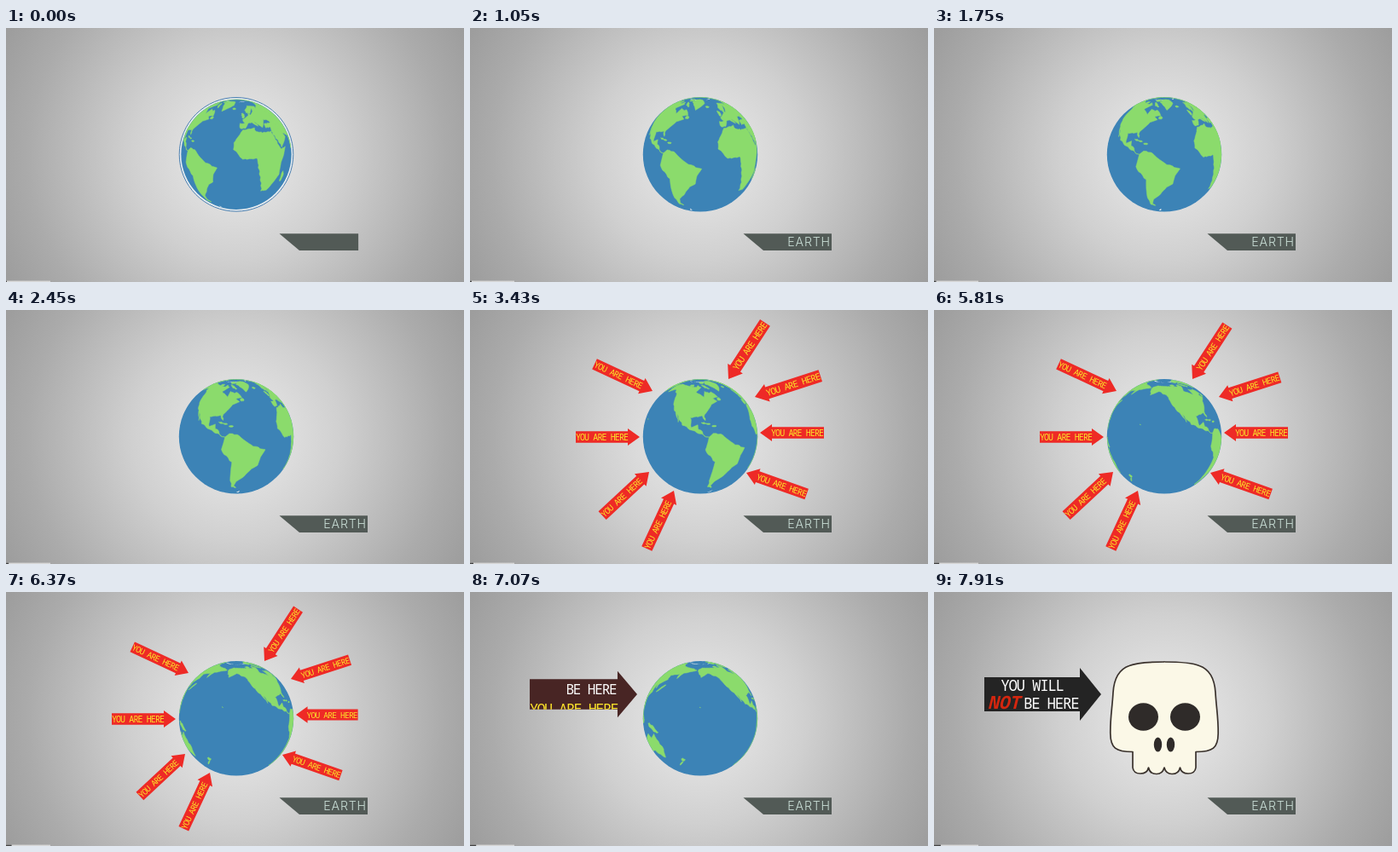
These frames come from a looping animation (537 by 298 pixels, 8 s). An HTML page:

```html
<!DOCTYPE html>
<html lang="en">
<head>
<meta charset="utf-8">
<title>Earth</title>
<style>
html, body { margin: 0; width: 100%; height: 100%; overflow: hidden; background: #aaa; }
svg { display: block; width: 100vw; height: 100vh; }
.mono { font-family: "Noto Sans Mono", "DejaVu Sans Mono", monospace; }
.you { font-size: 10px; letter-spacing: -.9px; fill: #fbe32a; }
.big { font-size: 17.5px; letter-spacing: -1.3px; fill: #fff; }
.not { font-size: 21px; font-weight: 700; font-style: italic; fill: #d3260f; }
.label { font: 300 14.2px Inter, "Open Sans", sans-serif; letter-spacing: .8px; fill: #c9ded6; }
</style>
</head>
<body>
<svg viewBox="0 0 537 298">
  <defs>
    <radialGradient id="bg" gradientUnits="userSpaceOnUse" cx="270" cy="149" r="305">
      <stop offset="0" stop-color="#ececec"/>
      <stop offset=".4" stop-color="#d0d0d0"/>
      <stop offset=".8" stop-color="#ababab"/>
      <stop offset="1" stop-color="#9d9d9d"/>
    </radialGradient>
    <clipPath id="disk"><circle r="67.3"/></clipPath>
    <clipPath id="tagClip"><path id="tagEdge"/></clipPath>
    <clipPath id="shaftClip"><rect id="shaft"/></clipPath>
  </defs>
  <rect width="537" height="298" fill="url(#bg)"/>
  <rect y="296.6" width="52" height="1.4" fill="#d9d9d9"/>
  <rect id="played" y="296.6" height="1.4" fill="#444"/>

  <circle id="ring" cx="270" cy="148.3" r="66.8" fill="#e9edf0" stroke="#4a7fb0"/>
  <g id="globe">
    <circle r="67.2" fill="#3c83b6"/>
    <g clip-path="url(#disk)">
      <path id="ice" fill="#f1f3f1"/>
      <path id="land" fill="#8bdb6c" stroke="#8bdb6c" stroke-width=".5" stroke-linejoin="round"/>
    </g>
  </g>

  <g id="skull">
    <g id="half">
      <path fill="#fbf8e7" stroke="#3a322d" stroke-width="1.7" stroke-linejoin="round"
        d="M-.5 -66C20 -66 33 -65 41 -61.5C54 -57 59 -46 60 -30C61 -12 63.5 0 63.2 18C63 35 57 39.5 37 39.5V58Q36 65 28 65Q20 65 18.5 58Q17 65.5 9 65.5Q2 65.5 0 58L-.5 58"/>
      <g fill="#2f2b29">
        <ellipse cx="24.500" cy="-1.500" rx="17.500" ry="16.300"/>
        <ellipse cx="7.500" cy="31" rx="4.700" ry="8.600"/>
      </g>
    </g>
    <use href="#half" transform="scale(-1 1)"/>
  </g>

  <g id="arrows"></g>

  <g id="hero">
    <path id="heroShape"/>
    <g clip-path="url(#shaftClip)">
      <text id="oldText" class="mono you" text-anchor="middle" y="3.6">YOU ARE HERE</text>
      <g id="newText">
        <text class="mono big" x="-81" y="-4" text-anchor="middle">YOU WILL</text>
        <text class="mono big" x="-91" y="17">BE HERE</text>
      </g>
    </g>
    <text id="not" class="mono not" text-anchor="middle" y="7.5">NOT</text>
  </g>

  <path id="tag" fill="#525a56"/>
  <g clip-path="url(#tagClip)"><text id="earth" class="label" y="256">EARTH</text></g>
</svg>
<script>
const LOOP = 8000, R = 67, RAD = Math.PI / 180, TILT = 9 * RAD;
const RED = [238, 42, 38], DARK = [36, 36, 36];
const $ = id => document.getElementById(id);
const set = (el, attrs) => { for (const k in attrs) el.setAttribute(k, attrs[k]); };
const show = (el, on) => set(el, { visibility: on ? "visible" : "hidden" });
const span = (t, a, b) => Math.min(1, Math.max(0, (t - a) / (b - a)));
const lerp = (a, b, p) => a + (b - a) * p;
const easeOut = p => 1 - (1 - p) ** 3;
const inOut = p => p < .5 ? 2 * p * p : 1 - 2 * (1 - p) ** 2;
const backOut = p => 1 + 2.7 * (p - 1) ** 3 + 1.7 * (p - 1) ** 2;

// Rough coastlines as lon, lat pairs
const northAmerica = [-167,67,-156,71,-128,70,-96,68,-94,72,-84,68,-94,60,-88,57,-80,52,-77,61,-69,58,
  -64,60,-56,52,-66,50,-61,46,-70,43,-76,36,-81,31,-80,25,-84,30,-97,28,-95,18,-88,21,-88,16,-83,14,
  -82,9,-77,8,-92,14,-105,20,-114,31,-110,23,-117,33,-124,41,-130,54,-146,61,-160,55,-165,62];
const southAmerica = [-77,8,-72,12,-62,10,-50,0,-35,-6,-39,-13,-41,-22,-48,-26,-57,-37,-65,-43,-69,-51,
  -66,-55,-73,-53,-73,-40,-70,-18,-81,-5,-78,3];
const africa = [-6,35,10,37,11,33,20,31,33,31,39,15,43,11,51,12,40,-4,40,-16,35,-22,27,-34,19,-34,13,-17,
  9,-1,9,4,-7,4,-17,14,-17,21,-10,30];
const europe = [-9,37,-9,43,-2,43,-4,48,8,54,8,57,12,54,22,60,25,65,17,60,12,56,6,58,5,62,20,70,41,67,38,64,
  60,69,50,30,35,31,36,36,28,36,28,41,41,41,37,45,31,46,23,37,13,45,17,39,9,44,3,43,-2,37];
const asia = [60,69,73,72,104,77,140,72,180,69,190,66,163,60,157,51,156,58,137,54,140,48,128,41,127,35,122,39,
  122,30,108,21,109,12,100,13,103,2,98,16,91,22,80,14,77,8,72,21,57,26,50,30];
const arabia = [50,30,59,22,44,13,35,28,35,31];
const greenland = [-45,60,-55,70,-68,76,-60,82,-35,83,-20,81,-22,72];
const australia = [114,-22,130,-12,136,-16,142,-11,153,-26,148,-38,131,-31,115,-34];
// Islands: lon, lat, half width, half height, slant
const islands = [[-73,69,10,2,-.4], [-80,79,12,3,0], [-111,71,7,2,0], [-56,49,3,2,0], [-80,22,5,.6,-.2],
  [-71,19,2.5,.8,0], [47,-19,2.5,6,0], [-2,54,2.5,4,0], [-19,65,4.500,1.5,0], [139,37,6,1.5,.8],
  [114,0,5,4,0], [141,-5,9,2.500,-.4], [176,-38,2.5,2,0], [171,-44,4,1,.8], [-162,20,.8,.5,0]];

function blob([lon, lat, w, h, slant]) {
  const ring = [];
  for (let a = 0; a < 6.2; a += .785) {
    const x = w * Math.cos(a);
    ring.push(lon + x, lat + h * Math.sin(a) + x * slant);
  }
  return ring;
}

// Split long edges so they bend with the sphere, and ripple the coast
function dense(ring) {
  const pts = [], n = ring.length;
  for (let i = 0; i < n; i += 2) {
    const [x, y, u, v] = [0, 1, 2, 3].map(k => ring[(i + k) % n]);
    const steps = Math.ceil(Math.max(Math.abs(u - x), Math.abs(v - y)) / 2.5);
    for (let k = 0; k < steps; k++) {
      const lon = lerp(x, u, k / steps), lat = lerp(y, v, k / steps);
      const wave = .55 * Math.sin(lon * 1.7 + lat * 2.3);
      pts.push([(lon + wave) * RAD, (lat + wave * .7) * RAD]);
    }
  }
  return pts;
}
const lands = [northAmerica, southAmerica, africa, europe, asia, arabia, greenland, australia,
  ...islands.map(blob)].map(dense);
const cap = [];
for (let lon = 0; lon < 360; lon += 15) cap.push(lon, 80.5 + Math.sin(lon / 20));
const ices = [cap, [-58, -63, -66, -70, -60, -70]].map(dense);

// Orthographic outline; points behind the globe slide to its rim
function outline(ring, lon0) {
  let seen = false;
  const pts = ring.map(([lon, lat]) => {
    const d = lon - lon0, c = Math.cos(lat), s = Math.sin(lat);
    let x = c * Math.sin(d);
    let y = s * Math.cos(TILT) - c * Math.cos(d) * Math.sin(TILT);
    if (s * Math.sin(TILT) + c * Math.cos(d) * Math.cos(TILT) > 0) seen = true;
    else { const h = Math.hypot(x, y) || 1; x /= h; y /= h; }
    return (x * R).toFixed(1) + " " + (-y * R).toFixed(1);
  });
  return seen ? "M" + pts.join("L") + "Z" : "";
}

// Arrow with its tip at 0,0; side -1 puts the shaft on the left
const arrowPath = (side, shaft, head, w, h) => {
  const a = side * head, b = side * (head + shaft);
  return `M0 0L${a} ${-h}L${a} ${-w}L${b} ${-w}L${b} ${w}L${a} ${w}L${a} ${h}Z`;
};
// tip x, tip y, angle, side
const arrows = [[214,95,25,-1], [210,190,-43,-1], [239,212,-65,-1], [324,191,19.5,1],
  [340,144,0,1], [303,81,-57,1], [334,102,-18,1]].map(([x, y, angle, side], i) => {
  const el = document.createElementNS("http://www.w3.org/2000/svg", "g");
  el.innerHTML = `<path fill="rgb(${RED})" d="${arrowPath(side, 61, 14, 6.7, 10)}"/>
    <text class="mono you" text-anchor="middle" x="${side * 44 - .4}" y="3.6">YOU ARE HERE</text>`;
  $("arrows").append(el);
  return { el, at: `translate(${x} ${y}) rotate(${angle})`, start: 2680 + i * 100 };
});

function drawGlobe(t) {
  const lon0 = (-14 - 20.9 * t / 1000) * RAD;
  const size = lerp(.962, 1, easeOut(span(t, 0, 300))) * (1 - span(t, 7320, 7450));
  show($("ring"), t < 300);
  show($("globe"), size > 0);
  set($("globe"), { transform: `translate(270 148.3) scale(${size})` });
  set($("land"), { d: lands.map(r => outline(r, lon0)).join("") });
  set($("ice"), { d: ices.map(r => outline(r, lon0)).join("") });
}

function drawArrows(t) {
  const leave = 1 - span(t, 6330, 6560) ** 2;
  for (const a of arrows) {
    const s = backOut(span(t, a.start, a.start + 320)) * leave;
    show(a.el, t > a.start && s > 0);
    set(a.el, { transform: `${a.at} scale(${Math.max(0, s)})` });
  }
}

function drawHero(t) {
  const pop = backOut(span(t, 2580, 2900));
  const p = inOut(span(t, 6650, 7250)), move = inOut(span(t, 6600, 6980));
  const roll = span(t, 6770, 7270), stamp = span(t, 7450, 7680);
  const shaft = lerp(61, 112, p), head = lerp(14, 25, p), w = lerp(6.7, 20, p), h = lerp(10, 31, p);
  const x = lerp(199, 196, move), y = lerp(149, 120, move);
  show($("hero"), t > 2580);
  set($("hero"), { transform: `translate(${x} ${y}) scale(${Math.max(0, pop)})` });
  set($("heroShape"), {
    d: arrowPath(-1, shaft, head, w, h),
    fill: `rgb(${RED.map((c, i) => Math.round(lerp(c, DARK[i], p)))})`
  });
  set($("shaft"), { x: -head - shaft, y: -w, width: shaft + 2, height: w * 2 });
  set($("oldText"), { transform: `translate(${-head - shaft / 2} ${28 * roll}) scale(${shaft / 61})` });
  set($("newText"), { transform: `translate(0 ${-40 * (1 - roll)}) scale(${shaft / 112})` });
  set($("oldText"), { opacity: roll < 1 ? 1 : 0 });
  set($("newText"), { opacity: roll > 0 ? 1 : 0 });
  set($("not"), { transform: `translate(-114 9) scale(${lerp(2, 1, easeOut(stamp))})`, opacity: stamp });
}

function draw(t) {
  drawGlobe(t);
  drawArrows(t);
  drawHero(t);

  const skull = backOut(span(t, 7400, 7800));
  show($("skull"), t > 7400);
  set($("skull"), { transform: `translate(270 148) scale(${Math.max(0, skull)})` });

  const edge = lerp(413, 424, easeOut(span(t, 0, 250)));
  const d = `M320.5 241.3H${edge}V261H344Z`;
  set($("tag"), { d });
  set($("tagEdge"), { d });
  set($("earth"), { x: lerp(427, 372.3, easeOut(span(t, 120, 700))) });
  set($("played"), { width: 1 + 7 * t / LOOP });
}

function tick() {
  draw(performance.now() % LOOP);
  requestAnimationFrame(tick);
}
tick();
</script>
</body>
</html>
```
